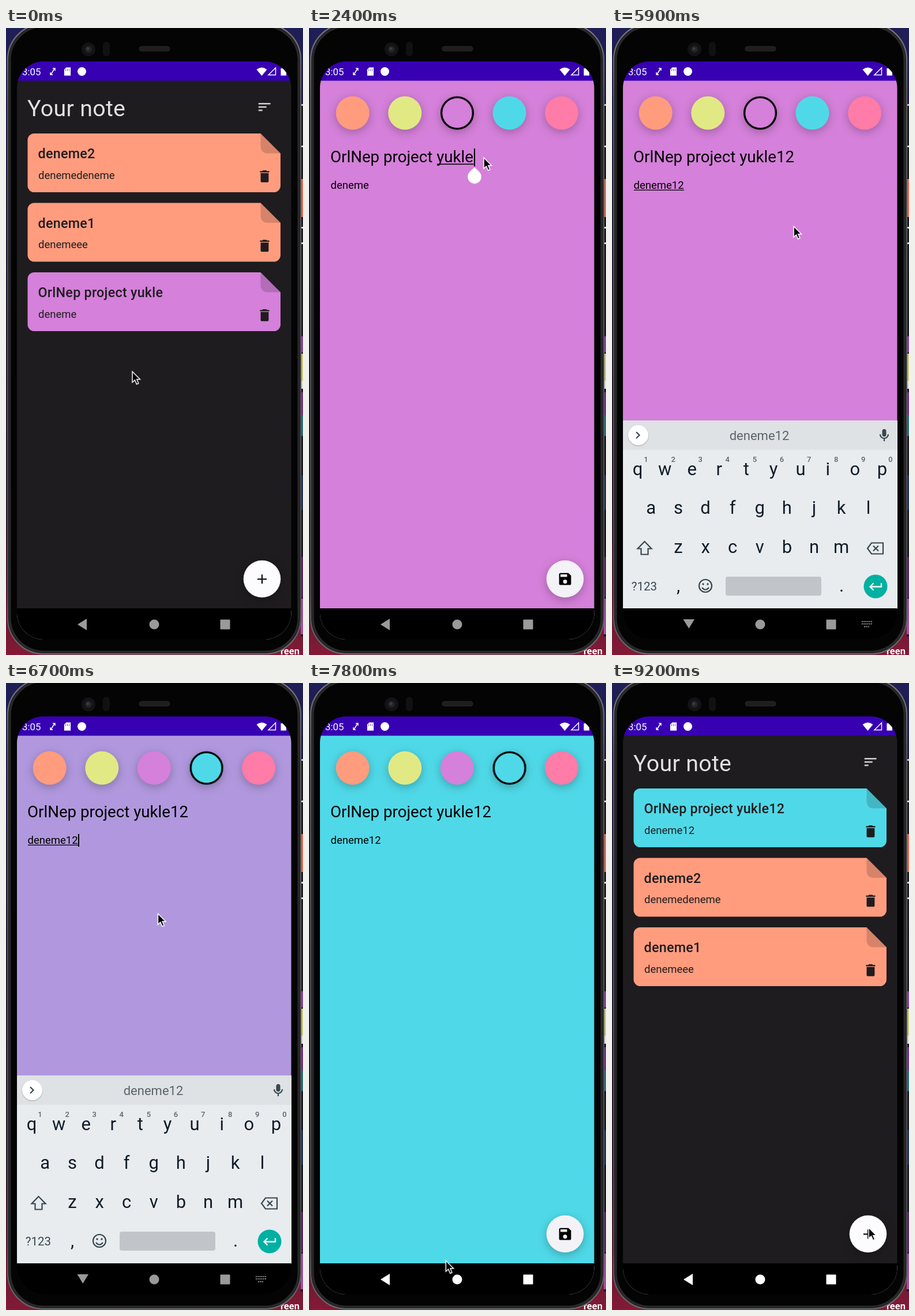
These frames come from a looping animation (515x1088 px, 9300 ms). An HTML page:

```html
<!DOCTYPE html>
<html lang="en">
<head>
<meta charset="utf-8">
<title>Notes app</title>
<style>
  html, body { margin: 0; width: 100%; height: 100%; overflow: hidden; background: #15132f; }
  svg { display: block; width: 100vw; height: 100vh; font-family: Roboto, Arial, sans-serif; }
  .heading { font-size: 39.3px; letter-spacing: .33px; fill: #e2e0e3; }
  .name { font-size: 23.3px; font-weight: 500; letter-spacing: .27px; fill: #1e1c1f; }
  .body { font-size: 18.5px; }
  .title { font-size: 27.7px; }
  .key { font-size: 31px; fill: #101c28; text-anchor: middle; }
  .hint { font-size: 13px; font-weight: 500; fill: #5b646b; text-anchor: middle; }
  .word { font-size: 22px; fill: #5b646b; text-anchor: middle; }
  .lift { filter: drop-shadow(0 4px 8px rgba(0, 0, 0, .26)); }
  .line { fill: none; stroke: #37474f; stroke-width: 2.2; }
</style>
</head>
<body>
<svg viewBox="0 0 515 1088" preserveAspectRatio="none">
  <defs>
    <linearGradient id="desk" x2="0" y2="1">
      <stop offset="0" stop-color="#1f1e57"/><stop offset=".25" stop-color="#191733"/>
      <stop offset=".8" stop-color="#2a1528"/><stop offset="1" stop-color="#841a36"/>
    </linearGradient>
    <linearGradient id="rim" x2="0" y2="1">
      <stop offset="0" stop-color="#77767a"/><stop offset=".12" stop-color="#57565a"/>
      <stop offset=".9" stop-color="#4a494d"/><stop offset="1" stop-color="#6a696d"/>
    </linearGradient>
    <clipPath id="screen"><rect x="19" y="58" width="475.500" height="1003" rx="46"/></clipPath>
    <path id="trash" d="M6 19c0 1.1.9 2 2 2h8c1.1 0 2-.9 2-2V7H6v12zM19 4h-3.500l-1-1h-5l-1 1H5v2h14V4z"/>
  </defs>

  <rect width="515" height="1088" fill="url(#desk)"/>
  <g id="windows"></g>
  <text x="476" y="1087" font-size="16.500" font-weight="700" fill="#fff">reen</text>

  <g id="phone">
    <rect x="3" y="-7" width="508" height="1093" rx="62" fill="#040405" stroke="url(#rim)" stroke-width="2.400"/>
    <rect x="6.500" y="-3.500" width="501" height="1086" rx="59" fill="none" stroke="#28272a" stroke-width="4"/>
    <circle cx="143" cy="37" r="12" fill="#131315"/>
    <circle cx="143" cy="37" r="6" fill="#232329"/>
    <circle cx="142" cy="36" r="2.500" fill="#3a3a43"/>
    <rect x="168" y="24" width="12" height="25" rx="6" fill="#111113"/>
    <rect x="231" y="32" width="53" height="8" rx="4" fill="#1f1d1e" stroke="#2b292a"/>
  </g>

  <g clip-path="url(#screen)">
    <rect x="19" y="58" width="476" height="1004" fill="#1e1c1f"/>

    <g id="list">
      <text class="heading" x="37" y="153">Your note</text>
      <path transform="translate(434.300 123.300) scale(1.155)" fill="#e8e6e9" d="M3 18h6v-2H3zM3 6v2h18V6zM3 13h12v-2H3z"/>
      <g id="before"></g>
      <g id="after"></g>
      <g class="lift"><circle cx="444" cy="956" r="32.300" fill="#fcfcff"/></g>
      <path d="M436 956.300h16M444 948.300v16" stroke="#111" stroke-width="2.300"/>
    </g>

    <g id="edit">
      <rect id="paper" x="19" y="91" width="476" height="917" fill="#d580da"/>
      <g id="swatches"></g>
      <circle id="ring" cy="147.500" r="27.400" fill="none" stroke="#000" stroke-width="3.400"/>
      <text class="title" x="37" y="233">OrlNep project yukle<tspan id="t1">1</tspan><tspan id="t2">2</tspan></text>
      <text class="body" x="37.500" y="279">deneme<tspan id="b1">1</tspan><tspan id="b2">2</tspan></text>
      <rect id="titleLine" x="222" y="235.500" height="1.600"/>
      <rect id="bodyLine" x="38" y="280.600" height="1.300"/>
      <rect id="caret" width="2"/>
      <path id="handle" fill="#fff" d="M0 0L8.300 8.300A11.800 11.800 0 1 1-8.300 8.300Z"/>
      <g class="lift"><circle cx="444" cy="956" r="32.300" fill="#f3f2f7"/></g>
      <path transform="translate(430.200 942.200) scale(1.155)" d="M17 3H5c-1.110 0-2 .9-2 2v14c0 1.100.89 2 2 2h14c1.100 0 2-.9 2-2V7zm-5 16a3 3 0 1 1 0-6 3 3 0 0 1 0 6zm3-10H5V5h10z"/>
    </g>

    <g id="keyboard">
      <rect x="19" y="681" width="476" height="327" fill="#e8ecef"/>
      <rect x="19" y="681" width="476" height="51" fill="#dee2e5"/>
      <circle cx="45.500" cy="706.500" r="17.500" fill="#fff" style="filter:drop-shadow(0 1px 1px #0004)"/>
      <path class="line" d="M42 701l5.500 5.500-5.500 5.500"/>
      <rect x="468.500" y="696" width="7" height="13" rx="3.500" fill="#37474f"/>
      <path class="line" d="M465 705a7 7 0 0 0 14 0M472 712v5"/>
      <g id="words"></g>
      <g id="keys"></g>
      <path class="line" d="M56.500 891L44.500 903.500H50.500V913.500H62.500V903.500H68.500Z"/>
      <path class="line" d="M443 903L450 893.500H470V912.500H450ZM453 898.500l9 9M462 898.500l-9 9"/>
      <text x="56" y="976" font-size="20.500" fill="#37474f" text-anchor="middle">?123</text>
      <circle class="line" cx="162" cy="968" r="11"/>
      <path class="line" d="M156 971q6 7 12 0"/>
      <circle cx="158" cy="965" r="1.700" fill="#37474f"/><circle cx="166" cy="965" r="1.700" fill="#37474f"/>
      <rect x="197" y="952" width="166" height="33" rx="4" fill="#c1c5c9"/>
      <circle cx="457" cy="969" r="20.500" fill="#00b0a1"/>
      <path id="check" d="M448 969.500l6 6 12.500-12.500" fill="none" stroke="#fff" stroke-width="2.300"/>
      <path id="enter" d="M467 963v6.500H448M453.500 963.500l-6 6 6 6" fill="none" stroke="#fff" stroke-width="2.300"/>
    </g>

    <rect x="19" y="58" width="476" height="33.500" fill="#3700b3"/>
    <g fill="#fff">
      <text x="28" y="81.500" font-size="16.800">3:05</text>
      <path d="M78 80.500l6-10M81 70h4v4M77 77v4h4" fill="none" stroke="#fff" stroke-width="1.500"/>
      <path d="M104.500 68h8v15h-12V72zM103.500 71.500v3M106.500 71.500v3M109.500 71.500v3" stroke="#3700b3" stroke-width=".8"/>
      <circle cx="131.500" cy="75.500" r="7.500"/>
      <path d="M434.500 72q9-7 18 0l-9 11z"/>
      <path d="M467.500 69v12.500H455z" fill="none" stroke="#fff" stroke-width="1.500"/>
      <path d="M476.500 70h2.500v-1.500h4V70h3v12.500h-9.500z"/>
    </g>

    <rect x="19" y="1007" width="476" height="55" fill="#000"/>
    <g id="nav">
      <path id="back" d="M124 1035l16-10v20z"/>
      <path id="down" d="M123.500 1026h19.500l-9.750 16z"/>
      <circle cx="257" cy="1035" r="8.500"/>
      <rect x="371.500" y="1026.500" width="17" height="17" rx="1"/>
      <path id="ime" d="M433 1030h18M433 1034h18M437 1039h10" fill="none" stroke="#8a8a8a" stroke-width="2" stroke-dasharray="2 1.200"/>
    </g>
  </g>

  <g id="cursor">
    <path transform="scale(1.070)" d="M1 1V18.500L5 14.800 8 21.500 11 20.200 8.200 13.700H13.500Z" stroke="#fff" stroke-width="1.400"/>
  </g>
</svg>

<script>
const D = 9300;
const ORANGE = '#ff9c7e', PURPLE = '#d580da', CYAN = '#4fd9e8';
const EASE = 'cubic-bezier(.4,0,.2,1)';
const $ = id => document.getElementById(id);

// Moments of the interaction, in ms
const T = { open: 600, tap: 2400, one: 4200, two: 4400, body: 4800, bodyOne: 5100, bodyTwo: 5300,
            pick: 6570, hide: 7350, save: 8575 };

// Frames are [ms, value, easing towards the next frame]
function track(el, prop, frames, ease = 'step-end') {
  const last = frames[frames.length - 1];
  if (last[0] < D) frames = [...frames, [D, last[1]]];
  el.animate(frames.map(([t, v, e]) => ({ offset: t / D, [prop]: v, easing: e || ease })),
    { duration: D, iterations: Infinity });
}
function show(el, from, to = D) {
  const frames = from ? [[0, 'hidden'], [from, 'visible']] : [[0, 'visible']];
  if (to < D) frames.push([to, 'hidden']);
  track(el, 'visibility', frames);
}
const move = (x, y) => `translate(${x}px,${y}px)`;

// Slivers of the windows behind the phone
$('windows').innerHTML = [
  [132, 924, '#1b1a1d'], [132, 3, '#ccc'], [204, 3, '#ddd'], [262, 66, '#e46a50'], [345, 3, '#ddd'],
  [372, 3, '#ddd'], [535, 28, '#8d3fa8'], [565, 47, '#c9c878'], [612, 14, '#ddd'], [632, 40, '#78308f'],
  [672, 36, '#26707c'], [776, 60, '#1f3553'], [918, 70, '#58255f'], [990, 62, '#a34f9b']
].map(([y, h, c]) => `<rect x="511" y="${y}" width="4" height="${h}" fill="${c}"/>`).join('');

const card = ([name, body, color], i) => `
  <g transform="translate(0 ${i * 120.5})">
    <path fill="${color}" d="M49 183H441.500L476 217.500V273.500a11.500 11.500 0 0 1-11.500 11.500H49A11.500 11.500 0 0 1 37.500 273.500V194.500A11.500 11.500 0 0 1 49 183Z"/>
    <path fill="#000" fill-opacity=".16" d="M441.500 183L476 217.500H453A11.500 11.500 0 0 1 441.500 206Z"/>
    <text class="name" x="55.500" y="226">${name}</text>
    <text class="body" x="56" y="261.500" fill="#1e1c1f">${body}</text>
    <use href="#trash" transform="translate(434.600 243.600) scale(1.155)" fill="#1e1c1f"/>
  </g>`;
const notes = [['deneme2', 'denemedeneme', ORANGE], ['deneme1', 'denemeee', ORANGE]];
$('before').innerHTML = [...notes, ['OrlNep project yukle', 'deneme', PURPLE]].map(card).join('');
$('after').innerHTML = [['OrlNep project yukle12', 'deneme12', CYAN], ...notes].map(card).join('');

$('swatches').innerHTML = [ORANGE, '#e1e984', PURPLE, CYAN, '#ff7ba8'].map((c, i) =>
  `<g class="lift"><circle cx="${75.7 + i * 90.6}" cy="147.500" r="29" fill="${c}"/></g>`).join('');

const row = (chars, x, y) => [...chars].map((c, i) =>
  `<text class="key" x="${x + i * 47.1}" y="${y}">${c}</text>`).join('');
$('keys').innerHTML = row('qwertyuiop', 44.5, 776) + row('asdfghjkl', 67.8, 843) + row('zxcvbnm', 115, 911) +
  row(',', 115, 978) + row('.', 398, 978) +
  [...'1234567890'].map((c, i) => `<text class="hint" x="${59 + i * 47.1}" y="753">${c}</text>`).join('');

// Suggestions
const words = [[T.tap, 'yukle'], [T.one, 'yukle1'], [T.two, 'yukle12'],
               [T.body, 'deneme'], [T.bodyOne, 'deneme1'], [T.bodyTwo, 'deneme12']];
$('words').innerHTML = words.map(w => `<text class="word" x="255.500" y="715">${w[1]}</text>`).join('');
[...$('words').children].forEach((el, i) => show(el, words[i][0], words[i + 1] ? words[i + 1][0] : D));

// Screens
show($('before'), 0, 5000);
show($('after'), 5000);
track($('edit'), 'opacity', [[0, 0], [T.open, 0, EASE], [T.open + 700, 1], [T.save, 1, EASE], [9200, 0]]);
track($('list'), 'opacity', [[0, 1], [T.open, 1, EASE], [T.open + 700, 0], [T.save, .6, EASE], [9200, 1]]);
track($('paper'), 'fill', [[0, PURPLE], [T.pick, PURPLE, EASE], [T.pick + 500, CYAN]]);
track($('ring'), 'transform', [[0, move(257, 0)], [T.pick, move(347.6, 0)]]);

// Typing
show($('t1'), T.one);
show($('t2'), T.two);
show($('b1'), T.bodyOne);
show($('b2'), T.bodyTwo);
track($('titleLine'), 'width', [[0, '0px'], [T.tap, '63.5px'], [T.one, '79px'], [T.two, '94.5px'], [T.body, '0px']]);
track($('bodyLine'), 'width', [[0, '0px'], [T.body, '66px'], [T.bodyOne, '76.5px'], [T.bodyTwo, '87px'], [T.hide, '0px']]);

const carets = [[T.tap, 286, 209], [T.one, 301.5, 209], [T.two, 317, 209],
                [T.body, 104, 262], [T.bodyOne, 114.5, 262], [T.bodyTwo, 125, 262]];
track($('caret'), 'transform', [[0, move(0, 0)], ...carets.map(([t, x, y]) => [t, move(x, y)])]);
track($('caret'), 'height', [[0, '31px'], [T.body, '22px']]);
const blink = [[0, 0]];
carets.forEach(([t], i) => {
  const end = carets[i + 1] ? carets[i + 1][0] : T.hide;
  for (let k = 0; t + k * 500 < end; k++) blink.push([t + k * 500, k % 2 ? 0 : 1]);
});
track($('caret'), 'opacity', [...blink, [T.hide, 0]]);
track($('handle'), 'transform', [[0, move(287, 241.5)], [T.body, move(105, 284)]]);
track($('handle'), 'opacity', [[0, 0], [T.tap, 1], [T.one, 0], [T.body, 1], [T.bodyOne, 0]]);

// Keyboard and navigation bar
track($('keyboard'), 'transform', [[0, move(0, 330)], [T.tap + 50, move(0, 330), EASE], [T.tap + 300, move(0, 0)],
  [T.hide, move(0, 0), EASE], [T.hide + 250, move(0, 330)]]);
show($('check'), 0, T.body);
show($('enter'), T.body);
track($('back'), 'opacity', [[0, 1], [T.tap + 100, 0], [T.hide, 1]]);
show($('down'), T.tap + 100, T.hide);
show($('ime'), T.tap + 100, T.hide);
track($('nav'), 'fill', [[0, '#9a9a9a'], [T.hide, '#fff']]);

track($('cursor'), 'transform', [
  [0, 218, 595], [100, 218, 595], [500, 168, 494], [1400, 168, 494], [2100, 302, 224], [2600, 302, 224],
  [3000, 320, 218], [4450, 320, 218], [4750, 180, 272], [5350, 180, 272], [5800, 314, 343], [5950, 314, 343],
  [6350, 349, 148], [6570, 349, 148], [6900, 84, 916], [7200, 132, 1030], [7500, 132, 1030],
  [8250, 444, 944]
].map(([t, x, y]) => [t, move(x, y)]), 'ease-in-out');
</script>
</body>
</html>
```
